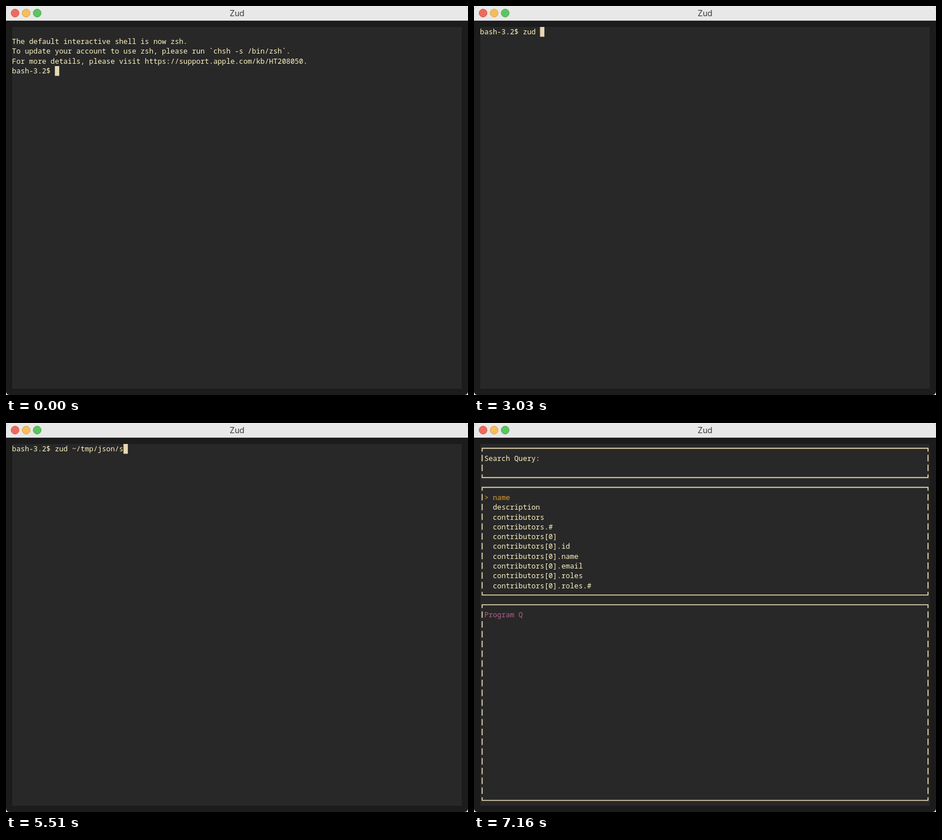
These frames come from a looping animation (815x687 px, 8 s). An HTML page:

```html
<!DOCTYPE html>
<html lang="en">
<head>
<meta charset="utf-8">
<title>Terminal</title>
<style>
  html, body { margin: 0; width: 100%; height: 100%; overflow: hidden; background: #fff; }
  svg { display: block; }
  .term text { font: 12.604px "Noto Sans Mono", monospace; white-space: pre; fill: #fdf4c1; }
  .term .active { fill: #dfa12e; }
  .term .value { fill: #b1628b; }
  .title { font: 14.3px Inter, sans-serif; fill: #3b3b3b; text-anchor: middle; }
  .frame { fill: none; stroke: #eee0b4; stroke-width: 1.7; }
  .cursor { fill: #e7d8b1; }
</style>
</head>
<body>
<svg width="815" height="687" viewBox="0 0 815 687">
  <clipPath id="window"><rect width="815" height="687" rx="6"/></clipPath>
  <g clip-path="url(#window)">
    <rect width="815" height="687" fill="#1c1c1c"/>
    <rect width="815" height="26" fill="#e8e8e8"/>
    <rect width="815" height="1" fill="#f3f3f3"/>
    <rect y="25" width="815" height="1" fill="#cfcfcf"/>
    <rect x="11" y="37" width="793" height="639" fill="#282828"/>
  </g>
  <g stroke-width="1">
    <circle cx="16" cy="12.5" r="7" fill="#ed6a5f" stroke="#d6554b"/>
    <circle cx="35.5" cy="12.5" r="7" fill="#f5bd5c" stroke="#daa045"/>
    <circle cx="55" cy="12.5" r="7" fill="#5bc561" stroke="#48a94c"/>
  </g>
  <text class="title" x="407.5" y="17.6">Zud</text>
  <g class="term" id="shell"></g>
  <g class="term" id="browser"></g>
</svg>
<script>
const LOOP = 8000;
const COL = 7.5625, ROW = 17.275, LEFT = 10.6, TOP = 37;
const LAST_COL = 104;
const shell = document.getElementById('shell');
const browser = document.getElementById('browser');

const colX = col => LEFT + col * COL;
const rowY = row => TOP + row * ROW;

function add(parent, tag, attrs, content = '') {
  const node = document.createElementNS('http://www.w3.org/2000/svg', tag);
  for (const key in attrs) node.setAttribute(key, attrs[key]);
  node.textContent = content;
  return parent.appendChild(node);
}

const print = (parent, col, row, content, cls = '') =>
  add(parent, 'text', { x: colX(col), y: rowY(row) + 12.7, class: cls }, content);

// Box-drawing glyphs are shorter than a row, so the sides are broken.
function drawFrame(first, last) {
  const x1 = colX(0.5), x2 = colX(LAST_COL + 0.5);
  const mid = row => rowY(row) + 7.6;
  let sides = '';
  for (let row = first; row <= last; row++) {
    const from = row === first ? mid(row) : mid(row) - 5.6;
    const to = row === last ? mid(row) : mid(row) + 5.8;
    for (const x of [x1, x2]) sides += `M${x} ${from}V${to}`;
  }
  const edges = [first, last].map(row => `M${x1 - 0.8} ${mid(row)}H${x2 + 0.8}`).join('');
  add(browser, 'path', { class: 'frame', d: sides + edges });
}

drawFrame(0, 3);
drawFrame(4, 15);
drawFrame(16, 36);
print(browser, 1, 1, 'Search Query:');
print(browser, 1, 5, '> name', 'active');
['description', 'contributors', 'contributors.#', 'contributors[0]',
 'contributors[0].id', 'contributors[0].name', 'contributors[0].email',
 'contributors[0].roles', 'contributors[0].roles.#']
  .forEach((path, i) => print(browser, 3, 6 + i, path));
print(browser, 1, 17, 'Program Q', 'value');

const PROMPT = 'bash-3.2$ ';
const COMMAND = 'zud ~/tmp/json/sample.json ';
const GREETING = ['', 'The default interactive shell is now zsh.',
  'To update your account to use zsh, please run `chsh -s /bin/zsh`.',
  'For more details, please visit https://support.apple.com/kb/HT208050.', PROMPT];
const ENTER = 7010, OPEN = 7160;

// [time, characters of the command on screen]; larger jumps are tab completions
const TYPING = [[410, 0], [1660, 1], [1740, 2], [2050, 3], [3030, 4], [3470, 5],
  [3750, 6], [3990, 7], [4130, 8], [4240, 10], [4630, 11], [4750, 12], [4890, 13],
  [5040, 15], [5510, 16], [5590, 17], [5670, 18], [5840, COMMAND.length]];

const lines = GREETING.map((_, row) => print(shell, 0, row, ''));
const cursor = add(shell, 'rect', { class: 'cursor', width: 7.7, height: 17.3 });

function shellLines(time) {
  if (time < TYPING[0][0]) return GREETING;
  const count = TYPING.findLast(([start]) => time >= start)[1];
  const line = PROMPT + COMMAND.slice(0, count);
  return time < ENTER ? [line] : [line, ''];
}

let shown = '';
function render(time) {
  const open = time >= OPEN;
  browser.style.display = open ? '' : 'none';
  shell.style.display = open ? 'none' : '';
  const content = shellLines(time);
  const key = content.join('\n');
  if (key === shown) return;
  shown = key;
  lines.forEach((node, row) => { node.textContent = content[row] || ''; });
  const row = content.length - 1;
  cursor.setAttribute('x', colX(content[row].length));
  cursor.setAttribute('y', rowY(row));
}

const startTime = performance.now();
function tick() {
  render((performance.now() - startTime) % LOOP);
  requestAnimationFrame(tick);
}
tick();
</script>
</body>
</html>
```
